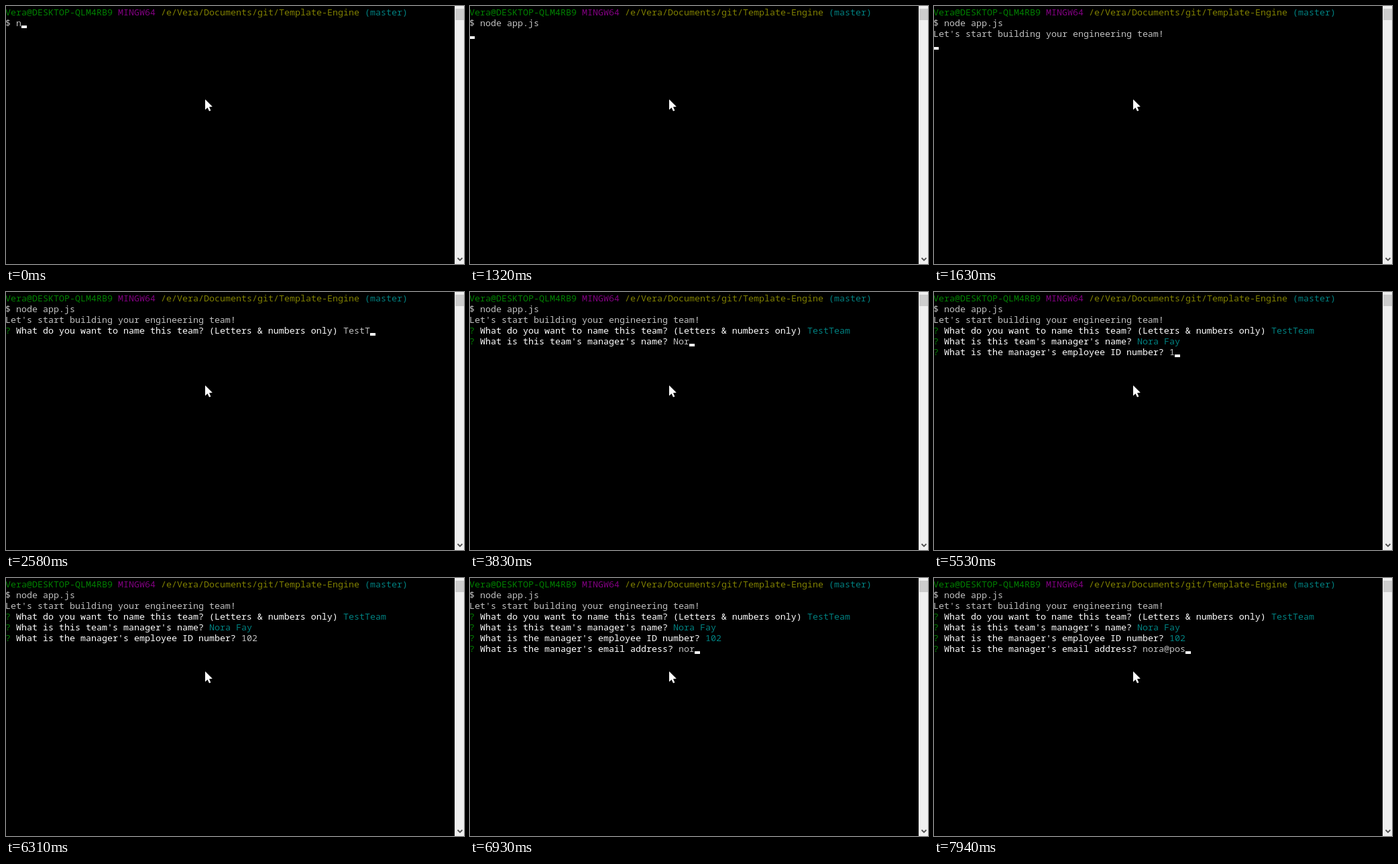
Recreate the animation shown at these times as an HTML page with a canvas. Size 683 px wide and 384 px high, loop 8000 ms.

```html
<!DOCTYPE html>
<html lang="en">
<head>
<meta charset="utf-8">
<title>Team builder terminal</title>
<style>
  html, body { margin: 0; width: 100%; height: 100%; overflow: hidden; background: #000; }
  canvas { display: block; }
</style>
</head>
<body>
<canvas id="stage" width="683" height="384"></canvas>
<script>
const ctx = document.getElementById("stage").getContext("2d");
const LOOP = 8000, CELL = 8, LINE = 16, LEFT = -1, TOP = 1;
const GRAY = "#c0c0c0", GREEN = "#008000", PURPLE = "#800080",
      OLIVE = "#808000", TEAL = "#008080", WHITE = "#fff";

const shellPrompt = [
  ["Vera@DESKTOP-QLM4RB9 ", GREEN],
  ["MINGW64 ", PURPLE],
  ["/e/Vera/Documents/git/Template-Engine ", OLIVE],
  ["(master)", TEAL]
];
const ask = text => [["?", GREEN], [" " + text + " ", WHITE]];
const prompts = [
  [["$ ", GRAY]],
  [["Let's start building your engineering team!", GRAY]],
  ask("What do you want to name this team? (Letters & numbers only)"),
  ask("What is this team's manager's name?"),
  ask("What is the manager's employee ID number?"),
  ask("What is the manager's email address?")
];

// Each event types text, or is one of the commands below.
const ENTER = 1, PROMPT = 2, HIDE = 3, SHOW = 4;
const events = [
  [0, PROMPT], [0, "n"], [80, "o"], [210, "d"], [340, "e"], [480, " "],
  [610, "a"], [740, "p"], [880, "p"], [1010, ".js "],
  [1320, ENTER], [1550, PROMPT], [1550, ENTER], [1680, PROMPT], [1820, HIDE],
  [1950, "T"], [2080, "e"], [2220, "s"], [2350, "t"], [2500, HIDE],
  [2580, "T"], [2730, "e"], [2860, "a"], [2990, "m"], [3130, HIDE],
  [3280, ENTER], [3280, PROMPT],
  [3600, "N"], [3720, "o"], [3830, "r"], [3980, HIDE], [4100, "a"],
  [4220, " "], [4350, "F"], [4470, "a"], [4590, "y"], [4900, HIDE],
  [5130, ENTER], [5130, PROMPT], [5260, HIDE], [5390, SHOW],
  [5520, "1"], [5650, "0"], [5780, HIDE], [5910, "2"], [6310, HIDE],
  [6380, ENTER], [6500, PROMPT],
  [6630, "n"], [6760, "o"], [6880, "r"], [7010, "a"], [7310, HIDE],
  [7470, "@"], [7630, "p"], [7780, "o"], [7940, "s"]
];

function stateAt(time) {
  const lines = [{ asked: false, input: "" }];
  let cursor = true;
  for (const [at, action] of events) {
    if (at > time) break;
    const line = lines[lines.length - 1];
    cursor = action !== HIDE;
    if (action === ENTER) lines.push({ asked: false, input: "" });
    else if (action === PROMPT) line.asked = true;
    else if (typeof action === "string") line.input += action;
  }
  return { lines, cursor };
}

// Draws colored runs on a row and returns the next column.
function drawRuns(runs, row, col = 0) {
  for (const [text, color] of runs) {
    ctx.fillStyle = color;
    ctx.fillText(text, LEFT + col * CELL, TOP + row * LINE + 13);
    col += text.length;
  }
  return col;
}

function drawScrollbar() {
  ctx.fillStyle = "#f0f0f0";
  ctx.fillRect(669, 0, 14, 384);
  ctx.fillStyle = "#cdcdcd";
  ctx.fillRect(670, 4, 13, 17);
  ctx.strokeStyle = "#505050";
  ctx.lineWidth = 1.8;
  ctx.beginPath();
  ctx.moveTo(673.5, 375);
  ctx.lineTo(677, 378.5);
  ctx.lineTo(680.5, 375);
  ctx.stroke();
}

function drawPointer() {
  const points = [[0, 0], [0, 15.5], [3.6, 12.2], [6, 17.6], [8.4, 16.5], [6, 11.2], [10.8, 10.8]];
  ctx.fillStyle = WHITE;
  ctx.beginPath();
  for (const [x, y] of points) ctx.lineTo(297 + x, 139 + y);
  ctx.fill();
}

function draw(time) {
  ctx.fillStyle = "#000";
  ctx.fillRect(0, 0, 683, 384);
  ctx.font = '13.3333px "Noto Sans Mono", "DejaVu Sans Mono", monospace';
  drawRuns(shellPrompt, 0);

  const { lines, cursor } = stateAt(time);
  const last = lines.length - 1;
  let col = 0;
  lines.forEach((line, i) => {
    const color = i > 1 && i < last ? TEAL : GRAY;
    col = line.asked ? drawRuns([...prompts[i], [line.input, color]], i + 1) : 0;
  });
  if (cursor) {
    ctx.fillStyle = WHITE;
    ctx.fillRect(LEFT + col * CELL, TOP + (last + 1) * LINE + 12, CELL, 4);
  }
  drawScrollbar();
  drawPointer();
}

const start = performance.now();
function tick() {
  draw((performance.now() - start) % LOOP);
  requestAnimationFrame(tick);
}
tick();
</script>
</body>
</html>
```
